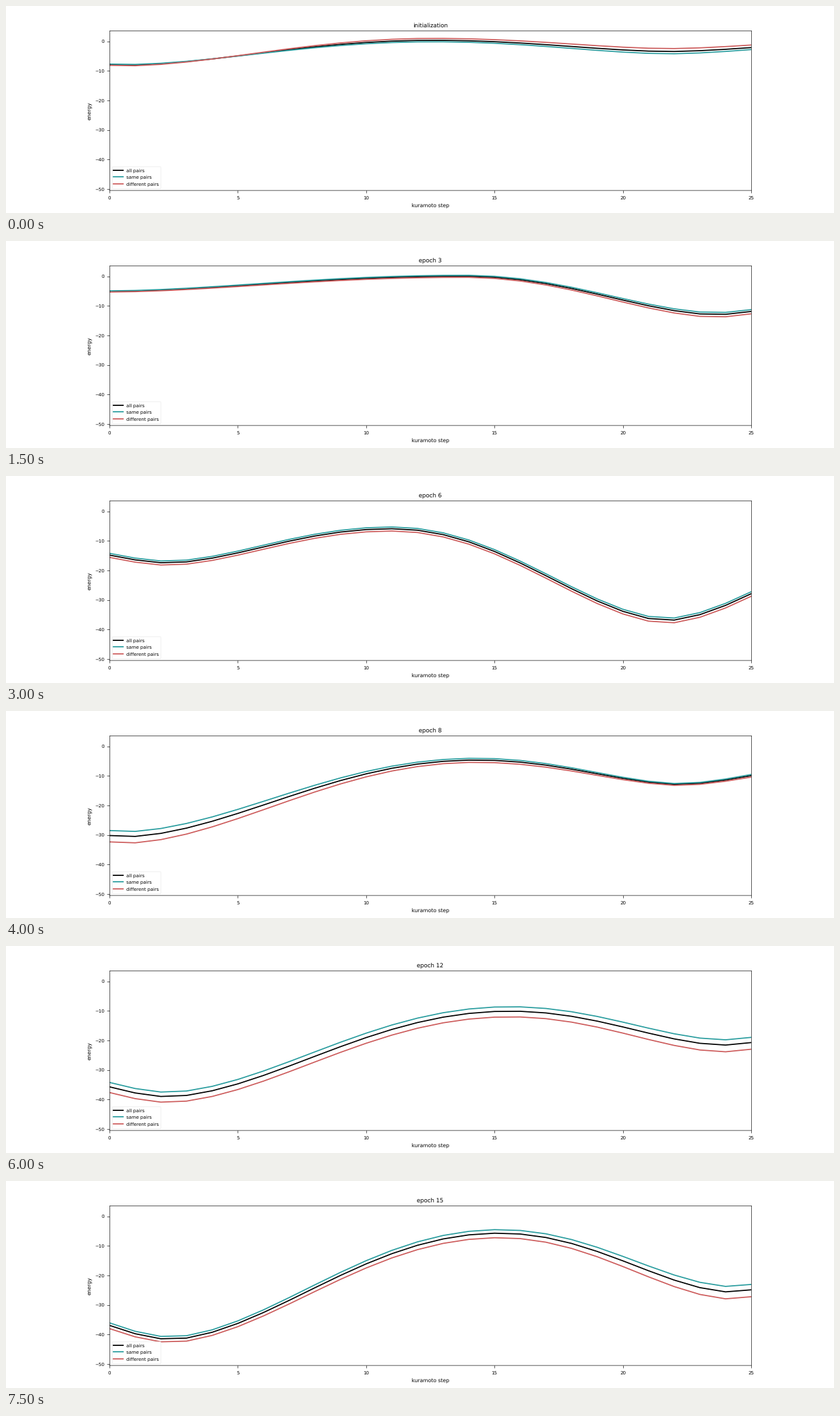
A matplotlib script that plays this animation: 1280 by 320 pixels, repeating every 8000 ms.

```python
import numpy as np
import matplotlib.pyplot as plt
from matplotlib.animation import FuncAnimation

plt.rcParams.update({
    "font.family": "DejaVu Sans",
    "text.hinting": "none",
    "axes.linewidth": 0.75,
    "xtick.major.size": 4, "ytick.major.size": 4,
    "xtick.major.pad": 5.4, "ytick.major.pad": 5,
    "xtick.major.width": 0.75, "ytick.major.width": 0.75,
    "xtick.labelsize": 8, "ytick.labelsize": 8,
})

EPOCHS = 16
STEPS = np.arange(26)
GAP_RATIO = 1.28

# Each wave is a trough, a crest and a trough, as (step, energy, gap).
# The gap is how far same pairs lie above the mean of all pairs.
WAVES = {
    0: [(0.7, -8.05, 0.2), (12.6, 0.35, -0.5), (21.8, -3.45, -0.77)],
    3: [(0, -5.1, 0.17), (13.8, 0.05, 0.3), (23.6, -13.0, 0.65)],
    6: [(2.3, -17.5, 0.6), (11, -5.9, 0.6), (21.7, -37.0, 0.7)],
    8: [(0.7, -30.6, 1.7), (14.3, -4.65, 0.6), (22.2, -12.9, 0.27)],
    10: [(2.2, -29.7, 1.65), (14.8, -5.25, 0.9), (23.8, -19.95, 1.6)],
    12: [(2.3, -39.1, 1.5), (15.6, -10.1, 1.5), (23.9, -21.6, 1.78)],
    15: [(2.4, -41.7, 0.8), (15.2, -5.7, 1.2), (24.2, -25.65, 1.85)],
}


def wave_at(epoch):
    """Ease slowly out of one known wave, then faster into the next."""
    start = max(k for k in WAVES if k <= epoch)
    end = min(k for k in WAVES if k >= epoch)
    u = (epoch - start) / max(end - start, 1)
    a, b = np.array(WAVES[start]), np.array(WAVES[end])
    return a + (b - a) * u ** 1.6


def curves(epoch):
    """Half cosines between trough and crest, with the troughs sharpened."""
    left, crest, right = wave_at(epoch)
    trough = np.where((STEPS <= crest[0])[:, None], left, right)
    t = np.abs((STEPS - trough[:, 0]) / (crest[0] - trough[:, 0]))
    rise = (1 - np.cos(np.pi * t ** 0.86)) / 2
    _, mean, gap = (trough + (crest - trough) * rise[:, None]).T
    return mean, mean + gap, mean - GAP_RATIO * gap


fig, ax = plt.subplots(figsize=(20, 5), dpi=64)
fig.subplots_adjust(left=0.125, right=0.9, bottom=0.109, top=0.88)
ax.spines["bottom"].set_snap(False)
ax.set(xlim=(0, 25), ylim=(-50.5, 3.55),
       xticks=range(0, 26, 5), yticks=range(-50, 1, 10))
ax.set_xlabel("kuramoto step", fontsize=9)
ax.set_ylabel("energy", fontsize=9)
title = ax.set_title("", fontsize=10)

STYLES = [("all pairs", "black"), ("same pairs", "#2a9d9f"),
          ("different pairs", "#cd5c5c")]
lines = [ax.plot([], [], color=color, lw=2, label=label)[0]
         for label, color in STYLES]
ax.legend(loc="lower left", fontsize=8, edgecolor="0.92")


def draw(epoch):
    title.set_text(f"epoch {epoch}" if epoch else "initialization")
    for line, energy in zip(lines, curves(epoch)):
        line.set_data(STEPS, energy)
    return [title, *lines]


anim = FuncAnimation(fig, draw, frames=EPOCHS, interval=500,
                     repeat=True, repeat_delay=0, blit=False)
plt.show()
```
